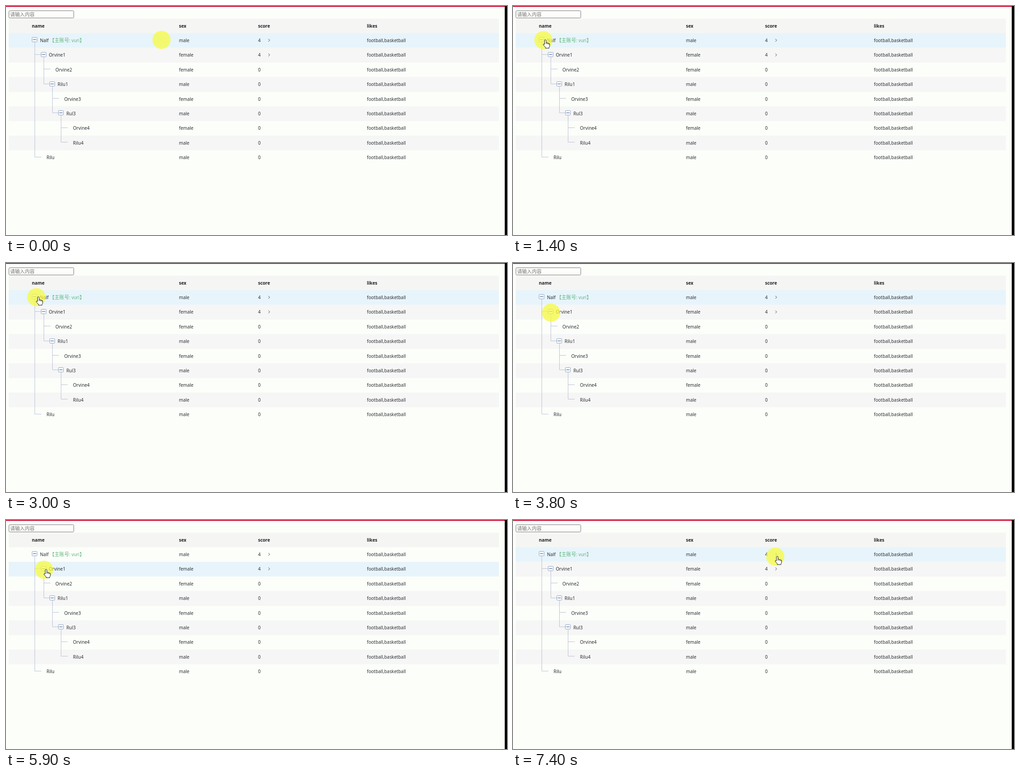
Animation of 1105 by 507 pixels, one loop 8 s. Source, as an HTML page:

```html
<!DOCTYPE html>
<html lang="zh">
<head>
<meta charset="utf-8">
<style>
  html, body { margin: 0; width: 100%; height: 100%; overflow: hidden; background: #fcfefa; }
  svg { display: block; width: 1105px; height: 507px; }
  text { font: 9.9px "Noto Sans", "Noto Sans CJK SC", sans-serif; fill: #2b2d31; white-space: pre; }
  .head { font-weight: 700; fill: #1f2125; }
  .cjk { font-size: 10.8px; font-family: "Noto Sans CJK SC", "Noto Sans CJK", sans-serif; }
  .hint { fill: #757575; }
  .tag { fill: #62b57d; }
  .branch { fill: none; stroke: #bcc0d4; }
  .box { fill: #fbfdff; stroke: #8fa3c2; }
  .sign { fill: none; stroke: #4c6698; stroke-width: 1.2; }
  .chevron { fill: none; stroke: #44464a; }
</style>
</head>
<body>
<svg viewBox="0 0 1105 507">
  <rect width="1100" height="2" fill="#d3163d"/>
  <rect x="1100" width="5" height="507" fill="#000"/>
  <rect x="6.5" y="10.5" width="143" height="16" rx="2" fill="#fdfefc" stroke="#777"/>
  <text class="cjk hint" x="9" y="23">请输入内容</text>
  <g id="table"></g>
  <circle id="spot" r="20" fill="#f8fb3c" opacity=".73"/>
  <path id="hand" fill="#fff" stroke="#111" stroke-linejoin="round"
    d="M-1.8 1.6Q-1.8 0 0 0T1.8 1.6V6.6Q3.6 5.6 4.9 7.2Q7 6.4 7.7 8.2Q9.6 8 9.6 10V13Q9.6 15 8.2 16.6V18.5H.2V16.6L-4.4 11.4Q-5 9.2-2.9 9.4L-1.8 10.4Z
       M1.8 6.6V9.5M4.9 7.2V10M7.7 8.2V10.5"/>
</svg>
<script>
const LOOP = 8000, STEP = 100, ROW = 32.4, INDENT = 19.4;
const COLUMNS = { name: 57, sex: 381.5, score: 556, likes: 796 };

const node = (name, sex, children = [], score = 0) => ({ name, sex, children, score });
const inner = node('Rul3', 'male', [node('Orvine4', 'female'), node('Rilu4', 'male')]);
const middle = node('Rilu1', 'male', [node('Orvine3', 'female'), inner]);
const child = node('Orvine1', 'female', [node('Orvine2', 'female'), middle], 4);
const root = node('Nalf', 'male', [child, node('Rilu', 'male')], 4);

// Pointer path: time, x, y
const PATH = [
  [0, 343, 75], [100, 343, 75], [600, 200, 74], [1000, 96, 106], [1400, 67, 75.5],
  [3700, 67, 75.5], [3800, 84, 110], [6500, 84, 110], [7400, 578.5, 81], [LOOP, 578.5, 81]
];
const HAND_TIMES = [[1300, 3800], [3900, 6500], [7300, LOOP]];
const within = (t, from, to) => t >= from && t < to;

function pointerAt(t) {
  const i = Math.max(1, PATH.findIndex(p => p[0] >= t));
  const [t0, x0, y0] = PATH[i - 1], [t1, x1, y1] = PATH[i];
  const k = Math.max(0, (t - t0) / (t1 - t0));
  return [x0 + (x1 - x0) * k, y0 + (y1 - y0) * k];
}

const label = (x, y, content, style = '') => `<text class="${style}" x="${x}" y="${y + 3.6}">${content}</text>`;
const band = (y, color) => `<rect x="6" y="${y}" width="1081" height="${ROW}" fill="${color}"/>`;
const line = (d, style) => `<path class="${style}" d="${d}"/>`;

function tableMarkup(collapsed, hovered) {
  let bands = band(28, '#f5f6f4'), branches = '', cells = '', count = 0;
  for (const [title, x] of Object.entries(COLUMNS)) cells += label(x, 44, title, 'head');

  function addRow(item, depth) {
    const index = count++, y = 76.4 + index * ROW, mid = Math.round(y - 2) + .5;
    const iconX = Math.round(63.2 + depth * INDENT) + .5, isOpen = item !== collapsed;
    if (index === hovered) bands += band(y - 16.2, '#e7f4fb');
    else if (index % 2) bands += band(y - 16.2, '#f5f6f5');

    const hasIcon = item.children.length > 0;
    cells += label((hasIcon ? 75 : 70.2) + depth * INDENT, y, item.name);
    if (item === root)
      cells += label(96, y, '【主账号<tspan style="font:9.9px \'Noto Sans\',sans-serif">: vuri</tspan>】', 'cjk tag');
    cells += label(COLUMNS.sex, y, item.sex) + label(COLUMNS.score, y, item.score)
      + label(COLUMNS.likes, y, 'football,basketball');
    if (item.score) cells += line(`M578.7 ${y - 3.5}l3 3l-3 3`, 'chevron');
    if (hasIcon) {
      cells += `<rect class="box" x="${iconX - 6}" y="${mid - 5}" width="11" height="10" rx="1"/>`
        + line(`M${iconX - 4} ${mid}h7` + (isOpen ? '' : `M${iconX - .5} ${mid - 3.5}v7`), 'sign');
      if (isOpen) {
        let last = mid;
        for (const next of item.children) {
          last = addRow(next, depth + 1);
          branches += line(`M${iconX} ${last}h14.5`, 'branch');
        }
        branches += line(`M${iconX} ${mid + 6}V${last}`, 'branch');
      }
    }
    return mid;
  }
  addRow(root, 0);
  return bands + branches + cells;
}

const [table, spot, hand] = ['table', 'spot', 'hand'].map(id => document.getElementById(id));
let shown = '';

function draw(now) {
  const t = Math.floor(now % LOOP / STEP) * STEP;
  const [x, y] = pointerAt(t);
  const collapsed = within(t, 1900, 3000) ? root : within(t, 5000, 5900) ? child : null;
  // Row hover follows one step behind the pointer
  const hovered = pointerAt(Math.max(0, t - STEP))[1] < 93 ? 0 : 1;
  const state = `${collapsed?.name}/${hovered}`;
  if (state !== shown) {
    table.innerHTML = tableMarkup(collapsed, hovered);
    shown = state;
  }
  spot.setAttribute('transform', `translate(${x} ${y})`);
  hand.setAttribute('transform', `translate(${x + 4.3} ${y - .7})`);
  hand.style.display = HAND_TIMES.some(span => within(t, ...span)) ? '' : 'none';
}

const start = performance.now();
function tick() {
  draw(performance.now() - start);
  requestAnimationFrame(tick);
}
tick();
</script>
</body>
</html>
```
